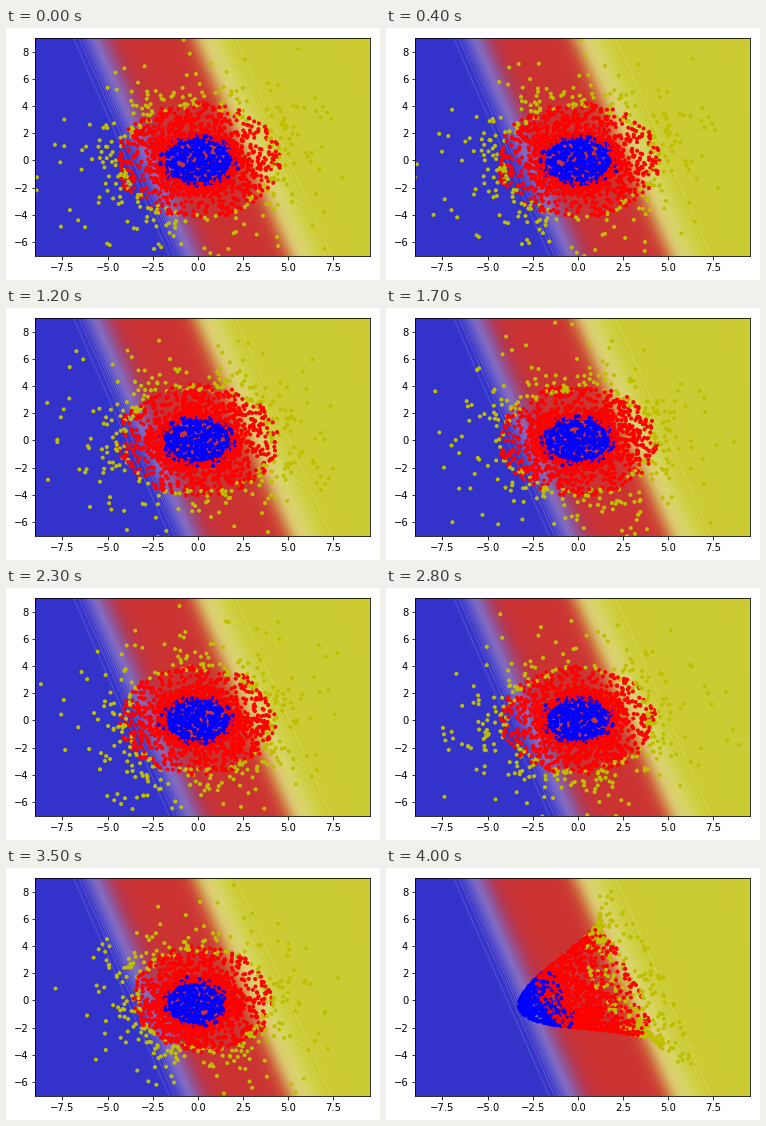
These frames come from a looping animation (374x252 px, 4.1 s). A matplotlib script:

```python
import numpy as np
import matplotlib.pyplot as plt
from matplotlib.animation import FuncAnimation

W, H, DPI = 374, 252, 72
FRAMES, INTERVAL = 41, 100
XLIM, YLIM = (-9.005, 9.53), (-7.03, 8.99)
TILT = 0.33                       # slope of the class boundaries
EDGES = (-2.3, 2.85)              # boundary positions along x + TILT * y
SEAMS = (-2.2, 3.35)              # where the pale contour seams gather
BLUE, RED, YELLOW = (0, 0, 1), (1, 0, 0), (0.75, 0.75, 0)

rng = np.random.default_rng(7)


def make_points():
    """Three nested rings in polar form, with a few far outliers."""
    far_r = [9.95, 9.0, 9.04, 8.1, 9.7, 9.05, 9.2, 9.6, 9.0]
    far_deg = [56, 188, 213, -9, 187, 251, 194, 317, 95]
    blue = 2.1 * np.sqrt(rng.random(460)) + rng.normal(0, 0.1, 460)
    red = 1.9 + 2.7 * rng.random(1000) ** 1.5
    yellow = np.minimum(4.1 + rng.exponential(1.35, 290), 8.0)
    radius = np.abs(np.concatenate([blue, red, yellow, far_r]))
    angle = rng.uniform(0, 2 * np.pi, radius.size)
    angle[-len(far_deg):] = np.radians(far_deg)
    counts = (blue.size, red.size, yellow.size + len(far_r))
    color = np.repeat([BLUE, RED, YELLOW], counts, axis=0)
    order = rng.permutation(radius.size)
    return radius[order], angle[order], color[order]


def rise(r, scale):
    return 1 - np.exp(-(r / scale) ** 2)


def unfolded(r, a):
    """Final state: radius is spread across the class boundaries."""
    u = -3.4 + 7.5 * rise(r, 3.2) + 1.3 * np.tanh(r / 4.5) * np.cos(a)
    v = -0.7 + 2.3 * rise(r, 3.0) + 1.15 * r / (1 + 0.05 * r) * np.sin(a)
    return np.column_stack([u - 0.34 * v, v])


def positions(k):
    r = radius * (1 - 0.08 * k / 35)
    a = angle - np.radians(125 * (1 - np.cos(np.pi * k / 40)))
    dip = 0.4 * np.exp(-((k - 36) / 3) ** 2) * np.exp(-r ** 2 / 10)
    flat = 1 - 0.13 * np.exp(-r ** 2 / 30)
    ring = np.column_stack([r * np.cos(a), r * np.sin(a) * flat - dip])
    s = max(0, (k - 33.5) / 6.5) ** 1.5
    return (1 - s) * ring + s * unfolded(r, a)


def sigmoid(z):
    return 1 / (1 + np.exp(-z))


def draw_background(ax):
    x, y = np.meshgrid(np.linspace(*XLIM, 670), np.linspace(*YLIM, 436))
    w = (x + TILT * y)[..., None]
    blue, red, yellow = np.array([[51, 51, 204], [204, 51, 51], [204, 204, 51]]) / 255
    p, q = sigmoid((w - EDGES[0]) / 0.36), sigmoid((w - EDGES[1]) / 0.3)
    image = blue + p * (red - blue) + q * (yellow - red)
    haze = (0.2 * np.exp(-((w + 2.6) / 0.65) ** 2)
            + 0.3 * np.exp(-((w - 3.4) / 0.65) ** 2))
    image += haze * (1 - image)
    ax.imshow(image, extent=(*XLIM, *YLIM), origin="lower", aspect="auto",
              interpolation="bilinear", zorder=0)

    # Thin pale seams at evenly spaced probability levels
    ys = np.array(YLIM)
    for level in np.arange(1, 22) / 60:
        offset = 0.42 * np.log(level / (1 - level))
        for pos in (SEAMS[0] + offset, SEAMS[1] - offset):
            ax.plot(pos - TILT * ys, ys, color="white", lw=0.45,
                    alpha=0.35 - 0.9 * level, zorder=1)


radius, angle, color = make_points()

fig = plt.figure(figsize=(W / DPI, H / DPI), dpi=DPI, facecolor="white")
ax = fig.add_axes([29.2 / W, 24.2 / H, 334.8 / W, 217.44 / H])
draw_background(ax)
dots = ax.scatter(*positions(0).T, s=9, c=color, edgecolors=color,
                  linewidths=1, zorder=2.4)
ax.set_xlim(XLIM)
ax.set_ylim(YLIM)
ax.set_xticks(np.arange(-7.5, 8, 2.5))
ax.set_yticks(range(-6, 9, 2))
ax.tick_params(labelsize=10)


def update(k):
    dots.set_offsets(positions(k))
    return (dots,)


anim = FuncAnimation(fig, update, frames=FRAMES, interval=INTERVAL,
                     init_func=lambda: update(0), repeat=True, blit=False)
plt.show()
```
